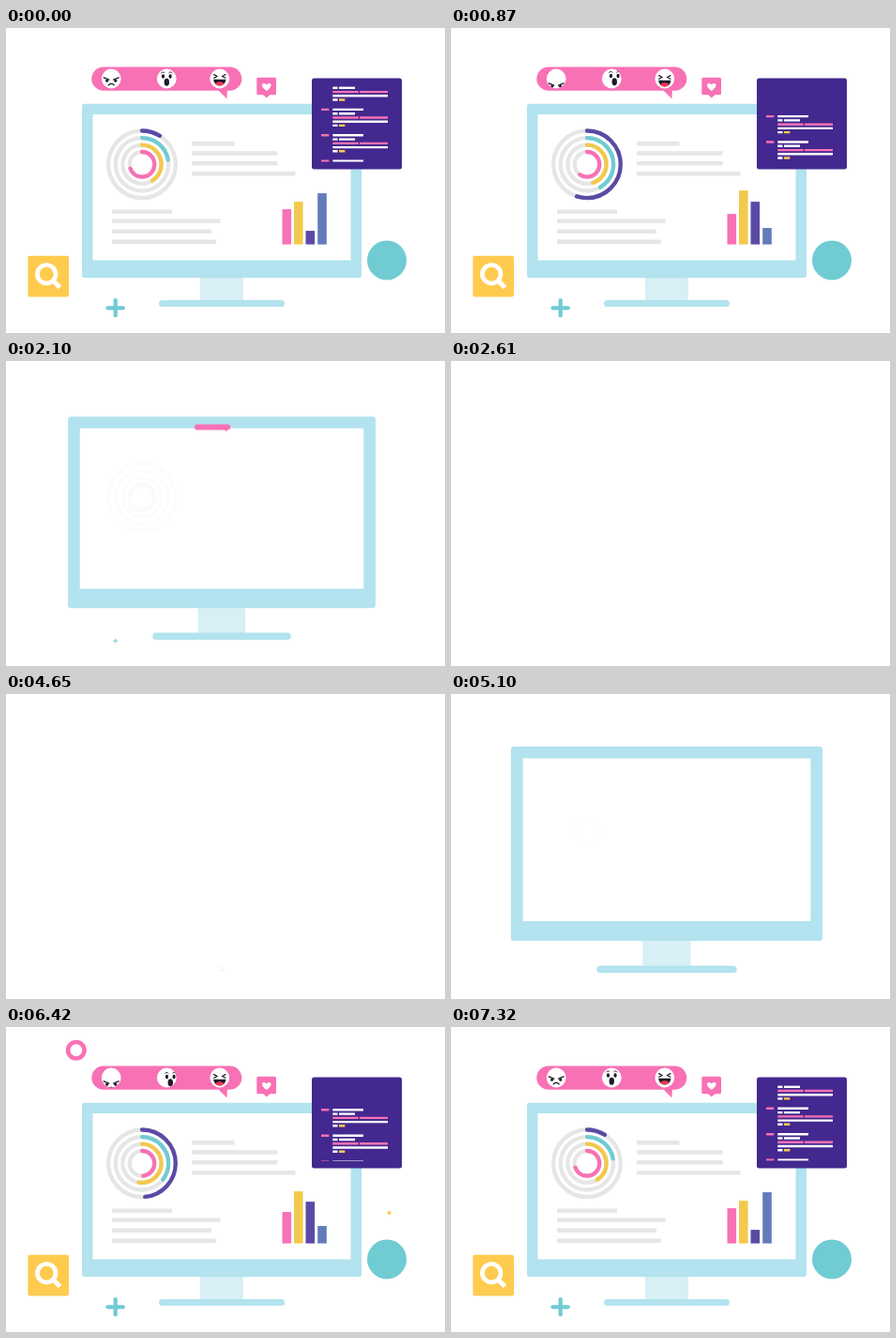
An HTML page with a canvas that plays this animation: 468 px wide and 325 px high, repeating every 7350 ms.

```html
<!DOCTYPE html>
<html lang="en">
<head>
<meta charset="utf-8">
<title>Dashboard loop</title>
<style>
html, body { margin: 0; width: 100%; height: 100%; overflow: hidden; background: #fff; }
canvas { display: block; width: 468px; height: 325px; }
</style>
</head>
<body>
<canvas id="stage"></canvas>
<script>
const W = 468, H = 325, LOOP = 7350;
const SKY = '#b2e3ee', PALE = '#d8eff6', PINK = '#f871b5', INDIGO = '#43288f',
  TEAL = '#70cbd3', YELLOW = '#ffcb4f', GOLD = '#f2c94c', VIOLET = '#5b4aa5',
  BLUE = '#627bb9', GRAY = '#e6e6e6', INK = '#1d1a2b', WHITE = '#fff';

const canvas = document.getElementById('stage');
const ctx = canvas.getContext('2d');
const dpr = window.devicePixelRatio || 1;
canvas.width = W * dpr;
canvas.height = H * dpr;

const clamp = p => Math.max(0, Math.min(1, p));
const ease = p => (1 - Math.cos(Math.PI * clamp(p))) / 2;

// Grow past full size, then settle.
function pop(u, start, peak, rise = 150, fall = 240) {
  const d = u - start;
  if (d <= 0) return 0;
  if (d < rise) return peak * d / rise;
  return peak + (1 - peak) * ease((d - rise) / fall);
}

// Appear and vanish again.
function blip(t, start) {
  const d = t - start;
  return d < 150 ? clamp(d / 150) : 1 - ease((d - 150) / 300);
}

// Smooth curve through values at the given times.
function curve(times, vals, u) {
  const n = times.length - 1;
  if (u <= times[0]) return vals[0];
  if (u >= times[n]) return vals[n];
  let i = 0;
  while (u > times[i + 1]) i++;
  const slope = k => k <= 0 || k >= n ? 0 :
    (vals[k + 1] - vals[k - 1]) / (times[k + 1] - times[k - 1]);
  const h = times[i + 1] - times[i], p = (u - times[i]) / h, q = 1 - p;
  return vals[i] * (1 + 2 * p) * q * q + slope(i) * h * p * q * q +
    vals[i + 1] * (3 - 2 * p) * p * p - slope(i + 1) * h * p * p * q;
}

function box(x, y, w, h, color, r = 0) {
  if (w <= 0 || h <= 0) return;
  ctx.fillStyle = color;
  ctx.beginPath();
  ctx.roundRect(x, y, w, h, r);
  ctx.fill();
}

function oval(x, y, rx, ry, color) {
  ctx.fillStyle = color;
  ctx.beginPath();
  ctx.ellipse(x, y, rx, ry, 0, 0, 7);
  ctx.fill();
}

function poly(points, color) {
  ctx.fillStyle = color;
  ctx.beginPath();
  points.forEach(([x, y]) => ctx.lineTo(x, y));
  ctx.fill();
}

function line(points, color, width, cap = 'round') {
  ctx.strokeStyle = color;
  ctx.lineWidth = width;
  ctx.lineCap = cap;
  ctx.lineJoin = 'round';
  ctx.beginPath();
  points.forEach(([x, y]) => ctx.lineTo(x, y));
  ctx.stroke();
}

function arc(x, y, r, from, to, color, width) {
  ctx.strokeStyle = color;
  ctx.lineWidth = width;
  ctx.lineCap = 'round';
  ctx.beginPath();
  ctx.arc(x, y, r, from, to);
  ctx.stroke();
}

function scaled(x, y, s, draw) {
  if (s <= 0) return;
  ctx.save();
  ctx.translate(x, y);
  ctx.scale(s, s);
  ctx.translate(-x, -y);
  draw();
  ctx.restore();
}

function monitor() {
  box(207, 265, 46, 26, PALE);
  box(163, 290, 134, 7, SKY, 3.5);
  box(81, 80.7, 298, 185.5, SKY, 3);
  box(92.5, 92, 275, 155.5, WHITE);
}

const CHART = [5180, 5520, 6360, 6420, 7320];
const RINGS = [
  [35.8, VIOLET, [0, 53, 198, 175, 32]],
  [28.2, TEAL, [0, 165, 150, 128, 80]],
  [20.6, GOLD, [0, 245, 162, 190, 148]],
  [13.3, PINK, [0, 290, 215, 175, 250]]
];

function rings(u) {
  ctx.globalAlpha = ease((u - 5080) / 200);
  for (const [r, color, vals] of RINGS) {
    arc(145, 145.3, r, 0, 2 * Math.PI, GRAY, 4.3);
    const deg = curve(CHART, vals, u), top = -Math.PI / 2;
    if (deg > 0.5) arc(145, 145.3, r, top, top + deg * Math.PI / 180, color, 4.3);
  }
  ctx.globalAlpha = 1;
}

const BARS = [
  [294.5, PINK, [0, 37.5, 32.5, 33.5, 37.5]],
  [307, GOLD, [0, 50.5, 57.5, 55.5, 45.5]],
  [319.5, VIOLET, [0, 33.5, 45.5, 44.5, 14.5]],
  [332.2, BLUE, [0, 50.5, 17.5, 18.5, 54.5]]
];

function bars(u) {
  for (const [x, color, vals] of BARS) {
    const h = curve(CHART, vals, u);
    box(x, 230.6 - h, 9.6, h, color);
  }
}

// x, y, width, start
const LINES = [
  [198, 123.3, 45.5, 5434], [198, 133.5, 91.5, 5520],
  [198, 144.2, 91.5, 5474], [198, 155.2, 110.5, 5420],
  [113, 195.8, 64, 5620], [113, 205.8, 115.5, 5660],
  [113, 216.8, 106, 5700], [113, 227.8, 111, 5740]
];

function textLines(u) {
  for (const [x, y, w, start] of LINES)
    box(x, y - 2.3, w * ease((u - start) / 400), 4.6, GRAY);
}

// row offset, x, width, color
const CODE = [
  [0, 336, 8.3, PINK], [0, 348.3, 32.7, WHITE],
  [4.3, 348.3, 5.2, WHITE], [4.3, 355, 17, WHITE],
  [8.6, 348.3, 27.5, PINK], [8.6, 377, 30, PINK],
  [12.8, 348.3, 58.7, WHITE],
  [17, 348.3, 5.2, WHITE], [17, 355, 6.3, YELLOW]
];

function panel(u) {
  box(326, 53.5, 96, 97, INDIGO, 2.5);
  ctx.beginPath();
  ctx.rect(330, 62.2, 90, 80.3);
  ctx.clip();
  const top = 88.4 - (u - 6420) * 0.0931;
  for (let k = 0; k < 6; k++)
    for (const [dy, x, w, color] of CODE)
      box(x, top + 27.4 * k + dy - 1.2, w, 2.4, color);
}

function search() {
  box(23.3, 242.8, 43.7, 43.7, YELLOW, 2);
  arc(43.2, 262.3, 9.8, 0, 7, WHITE, 4.6);
  line([[50.5, 269.5], [57.5, 276.5]], WHITE, 5, 'butt');
}

function plus() {
  line([[108.5, 298.3], [124.9, 298.3]], TEAL, 4.2);
  line([[116.7, 290.2], [116.7, 306.4]], TEAL, 4.2);
}

function heartTag() {
  box(267.3, 52.7, 20.7, 18.6, PINK, 1.5);
  poly([[274, 71], [281.6, 71], [277.8, 74.6]], PINK);
  ctx.fillStyle = WHITE;
  ctx.beginPath();
  ctx.moveTo(277.8, 67);
  ctx.bezierCurveTo(270, 61.5, 273, 56.5, 277.8, 60.2);
  ctx.bezierCurveTo(282.6, 56.5, 285.6, 61.5, 277.8, 67);
  ctx.fill();
}

function bubble() {
  box(91.3, 41.5, 160, 25.3, PINK, 12.6);
  poly([[226, 66], [235.4, 75.6], [236, 64]], PINK);
}

function angry() {
  line([[-8, -1.2], [-2.4, 1.2]], INK, 1.3);
  line([[8, -1.2], [2.4, 1.2]], INK, 1.3);
  oval(-4.6, 2.2, 1.5, 1.5, INK);
  oval(4.6, 2.2, 1.5, 1.5, INK);
  arc(0, 9, 3.6, Math.PI * 1.2, Math.PI * 1.8, INK, 1.3);
}

function amazed() {
  arc(-4, -4.6, 2, Math.PI * 1.15, Math.PI * 1.8, INK, 0.9);
  arc(4, -4.6, 2, Math.PI * 1.2, Math.PI * 1.85, INK, 0.9);
  oval(-3.8, -2, 1.6, 2.2, INK);
  oval(3.8, -2, 1.6, 2.2, INK);
  oval(0, 4.3, 2.7, 4, INK);
}

function laughing() {
  line([[-6.2, -4.4], [-2.6, -2.5], [-6.2, -0.8]], INK, 1.2);
  line([[6.2, -4.4], [2.6, -2.5], [6.2, -0.8]], INK, 1.2);
  ctx.fillStyle = INK;
  ctx.beginPath();
  ctx.arc(0, 0.8, 6.6, 0, Math.PI);
  ctx.save();
  ctx.fill();
  ctx.clip();
  oval(0, 6.6, 5, 3.4, '#f0364f');
  ctx.restore();
}

const LOOK = [5520, 6360, 6420, 6850, 7320];
// x, start, draw, look x, look y
const FACES = [
  [112.2, 5165, angry, [0, 0, 0, -5, 0], [6, 6, 5, -1, 0]],
  [171.3, 5265, amazed, [0, 3, 4, 1, 0], [-1, -1, 1, 1, -0.5]],
  [227.8, 5420, laughing, [0, 0, 0, 0, 0], [0, 1, 1, -1, 0]]
];

function faces(u) {
  for (const [x, start, draw, lx, ly] of FACES)
    scaled(x, 64.5, pop(u, start, 1.4), () => {
      oval(x, 54, 10.4, 10.4, WHITE);
      ctx.clip();
      ctx.translate(x + curve(LOOK, lx, u), 54 + curve(LOOK, ly, u));
      draw();
    });
}

function sparks(t) {
  const a = 13 * blip(t, 5440), b = 14 * blip(t, 6400), s = blip(t, 6310);
  if (a > 0) oval(50.7, 193, a, a, YELLOW);
  if (b > 0) oval(408.6, 198, b, b, YELLOW);
  scaled(74.8, 24.8, s, () => arc(74.8, 24.8, 11.8, 0, 7, PINK, 6.2));
}

// The exit runs the entrance backwards.
function poseTime(t) {
  if (t < 870) return 7320 - t * 960 / 870;
  return t < 3650 ? 7230 - t : Math.min(t, 7320);
}

function render(t) {
  const u = poseTime(t);
  ctx.setTransform(dpr, 0, 0, dpr, 0, 0);
  ctx.fillStyle = WHITE;
  ctx.fillRect(0, 0, W, H);

  const rise = u < 5040 ? 1.13 * ease((u - 4620) / 420)
    : 1.13 - 0.13 * ease((u - 5040) / 280);
  scaled(230, 295, rise, monitor);
  rings(u);
  textLines(u);
  bars(u);
  scaled(326, 150.5, pop(u, 5284, 1.52), () => panel(u));
  scaled(67, 286.5, pop(u, 5245, 1.4), search);
  scaled(116.7, 298.3, pop(u, 5103, 1.4), plus);
  scaled(406, 247.5, pop(u, 5178, 1.5), () => oval(406, 247.5, 21, 21, TEAL));
  scaled(277.8, 64, pop(u, 5290, 1.5), heartTag);
  scaled(235.4, 75.6, pop(u, 5103, 1.38), bubble);
  faces(u);
  sparks(t);
}

const begin = performance.now();
function tick() {
  render((performance.now() - begin) % LOOP);
  requestAnimationFrame(tick);
}
tick();
</script>
</body>
</html>
```
